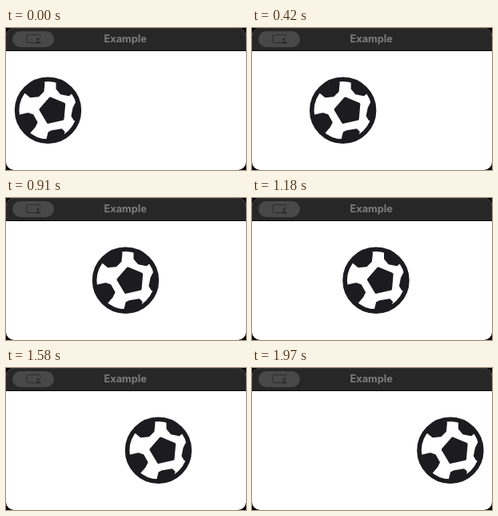
Animation of 300x178 px, one loop 2450 ms. Source, as an HTML page:

```html
<!DOCTYPE html>
<html lang="en">
<head>
<meta charset="utf-8">
<style>
  html, body { margin: 0; width: 100%; height: 100%; overflow: hidden; background: #000; }
  svg { display: block; width: 100vw; height: 100vh; }
  text { font: 700 12.8px Inter, Arial, sans-serif; fill: #7c7c7c; text-anchor: middle; }
</style>
</head>
<body>
<svg viewBox="0 0 300 178">
  <defs>
    <clipPath id="window"><rect width="300" height="178" rx="10"/></clipPath>
    <clipPath id="inside"><circle r="38"/></clipPath>
  </defs>
  <g clip-path="url(#window)">
    <rect width="300" height="178" fill="#fff"/>
    <rect width="300" height="28" fill="#272727"/>
    <rect width="300" height="1" fill="#343434"/>
    <rect y="28" width="300" height="1" fill="#060606"/>
    <rect x="8" y="4" width="52" height="20" rx="10" fill="#484848"/>
    <g fill="none" stroke="#2b2b2b" stroke-width="1">
      <path d="M36 18.5H28a2 2 0 0 1-2-2V10.5a2 2 0 0 1 2-2H41a2 2 0 0 1 2 2V11"/>
      <circle cx="40" cy="14" r="1.7" fill="#2b2b2b" stroke="none"/>
      <path d="M36.5 19.5q0-3 3.5-3t3.5 3z" fill="#2b2b2b" stroke="none"/>
    </g>
    <text x="149.2" y="18">Example</text>
    <g id="ball">
      <circle r="39" fill="#fff"/>
      <g clip-path="url(#inside)" fill="#1c1c20" stroke="#1c1c20" stroke-width="2" stroke-linejoin="round">
        <path d="M-32-25L-28-22L-22-17L-12-18L-6-24L-5-34L-8-45H-30Z"/>
        <path d="M11-34L11-27L16-21L26-19L31-23L38-30L20-45Z"/>
        <path d="M40-10L35-9L32-3L30 7L33 12H42Z"/>
        <path d="M-2 40L1 28L5 26L17 24L20 27L18 34L18 42Z"/>
        <path d="M-40 7L-34 6L-25 4L-19 6L-14 15L-17 21L-23 28L-34 34Z"/>
      </g>
      <path id="pentagon" fill="#1c1c20" stroke="#1c1c20" stroke-width="4" stroke-linejoin="round"/>
      <circle r="38.9" fill="none" stroke="#1c1c20" stroke-width="5.6"/>
    </g>
  </g>
</svg>
<script>
  const LOOP = 2450, STEP = 30, STEPS = 65;
  const MIDDLE = 150.2, REACH = 97.7;
  const ball = document.getElementById('ball');

  const corners = Array.from({ length: 5 }, (_, i) => {
    const angle = (-103 + 72 * i) * Math.PI / 180;
    return [6.4 + 15.5 * Math.cos(angle), 0.4 + 15.5 * Math.sin(angle)];
  });
  document.getElementById('pentagon').setAttribute('d', `M${corners.join('L')}Z`);

  // Whole steps taken so far; the beat slips by 10 ms twice per loop.
  function stepAt(t) {
    const slip = t >= 1640 ? 20 : t >= 550 ? 10 : 0;
    return Math.min(Math.floor((t - slip) / STEP), STEPS);
  }

  // Sine out-in: fast at both ends, resting in the middle.
  function ballX(step) {
    const u = 2 * step / STEPS - 1;
    return MIDDLE + REACH * Math.sign(u) * (1 - Math.cos(u * Math.PI / 2));
  }

  function draw(time) {
    ball.setAttribute('transform', `translate(${ballX(stepAt(time % LOOP))} 103.2)`);
  }

  const start = performance.now();
  function tick() {
    draw(performance.now() - start);
    requestAnimationFrame(tick);
  }
  draw(0);
  requestAnimationFrame(tick);
</script>
</body>
</html>
```
